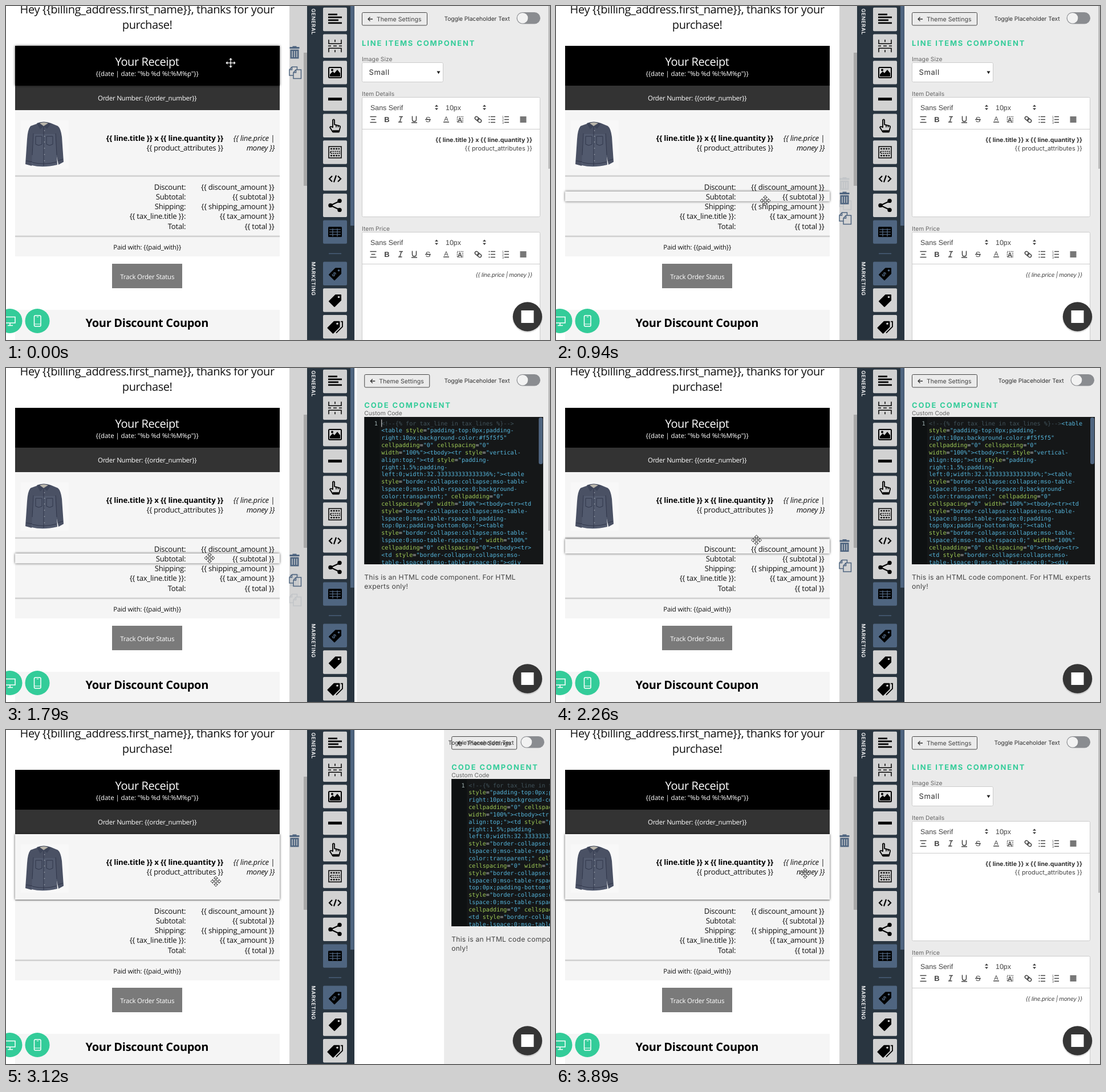
Recreate the animation shown at these times as an HTML page. Size 954 by 587 pixels, loop 3970 ms.

```html
<!DOCTYPE html>
<html lang="en">
<head>
<meta charset="utf-8">
<title>Receipt email editor</title>
<style>
html, body { margin: 0; width: 100%; height: 100%; overflow: hidden; background: #fff; }
svg { display: block; text-rendering: geometricPrecision; }
text { white-space: pre; }
.mail { font-family: "Open Sans", "Noto Sans", sans-serif; font-size: 13.2px; letter-spacing: -.02em; }
.big { font-size: 20px; }
.fine { font-size: 11.5px; }
.ui { font-family: Inter, Roboto, sans-serif; font-size: 10.3px; }
.head { font-size: 13px; font-weight: 700; letter-spacing: 1.85px; }
.edit { font-family: "Liberation Sans", Arial, sans-serif; font-size: 12.4px; }
.code { font-family: "DejaVu Sans Mono", monospace; font-size: 10.17px; }
.bold { font-weight: 700; }
.it { font-style: italic; }
.mid { text-anchor: middle; }
.end { text-anchor: end; }
.line { fill: none; stroke: currentColor; stroke-width: 1.5; }
#hover { filter: drop-shadow(0 .5px 2px rgba(0,0,0,.65)); }
</style>
</head>
<body>
<svg id="stage" width="100%" height="100%" viewBox="0 0 954 587"></svg>
<script>
const LOOP = 3970;
const GREEN = '#33cc99', BLUE = '#4f6580', DARK = '#293540', TILE = '#d2d2d2';

const esc = s => s.replace(/&/g, '&amp;').replace(/</g, '&lt;').replace(/>/g, '&gt;');
const rect = (x, y, w, h, fill, more = '') =>
  `<rect x="${x}" y="${y}" width="${w}" height="${h}" fill="${fill}" ${more}/>`;
const dot = (x, y, r, fill, more = '') => `<circle cx="${x}" cy="${y}" r="${r}" fill="${fill}" ${more}/>`;
const text = (x, y, s, cls, fill = '#000', more = '') =>
  `<text x="${x}" y="${y}" class="${cls}" fill="${fill}" ${more}>${esc(s)}</text>`;
const fill = (d, c = '#000', more = '') => `<path d="${d}" fill="${c}" ${more}/>`;
const line = (d, more = '') => `<path d="${d}" class="line" ${more}/>`;
const at = (x, y, body, more = '') => `<g transform="translate(${x} ${y})" ${more}>${body}</g>`;

/* ---- email preview ---- */

// Hoverable rows: top, bottom, colour, has a copy button
const rows = [
  [70, 140, '#000', 1], [140, 183, '#333', 1], [183, 298, '#f5f5f5', 0], [300.5, 326, '#f5f5f5', 1],
  [326, 343.3, '#f5f5f5', 1], [343.3, 360.6, '#f5f5f5', 1], [360.6, 378, '#f5f5f5', 1]
];

function mailBack() {
  return rect(0, 0, 497, 587, '#fff') + rect(497, 0, 31, 587, '#d3d3d3') + rect(522, 82, 6, 234, '#a9a9a9') +
    rect(16, 70, 464, 70, '#000') + rect(16, 140, 464, 43, '#333') + rect(16, 183, 464, 257, '#f5f5f5') +
    rect(16, 297.5, 464, 2.6, '#d0d0d0') + rect(16, 403.5, 464, 2.6, '#d0d0d0') +
    rect(186, 453, 123, 43, '#7a7a7a') + rect(16, 534, 464, 53, '#f5f5f5');
}

function jacket() {
  return rect(26, 201, 84, 85, '#f8f8f8') +
    fill('M54 207L43 211Q38 217 37 234L34 278L45 281L49 250L86 250L92 279L101 274L98 230Q96 215 91 211L79 206Z', '#4a5164') +
    fill('M47 225L45 280Q65 285 90 279L87 225Z', '#525a6e') +
    fill('M54 206Q66 201 79 206L72 216L66 211L60 217Z', '#3d4458') +
    fill('M59 206Q66 203 74 206L66 211Z', '#b9b5aa') +
    line('M66 212V281M48 224L46 262M87 224L89 262M52 229h11v14l-5.5 2l-5.5-2zM71 229h11v14l-5.5 2l-5.5-2z' +
      'M46 275Q68 280 89 274M35 272l11 2M91 272l9-3', 'color="#30364a" style="stroke-width:1"') +
    [219, 229, 239, 250, 261, 272].map(y => dot(67.5, y, .8, '#aeb2bd')).join('');
}

function mailText() {
  const totals = [['Discount:', 'discount_amount'], ['Subtotal:', 'subtotal'], ['Shipping:', 'shipping_amount'],
    ['{{ tax_line.title }}:', 'tax_amount'], ['Total:', 'total']];
  return text(247.7, 13, 'Hey {{billing_address.first_name}}, thanks for your', 'mail big mid', '#111') +
    text(247.7, 39.5, 'purchase!', 'mail big mid', '#111') +
    text(247.5, 104.5, 'Your Receipt', 'mail big mid', '#fff') +
    text(247.7, 123, '{{date | date: "%b %d %I:%M%p"}}', 'mail fine mid', '#fff', 'style="letter-spacing:-.01em"') +
    text(247.7, 166, 'Order Number: {{order_number}}', 'mail fine mid', '#fff') +
    jacket() +
    text(381, 237, '{{ line.title }} x {{ line.quantity }}', 'mail bold end', '#000', 'style="letter-spacing:-.01em"') +
    text(381, 254, '{{ product_attributes }}', 'mail end', '#111') +
    text(471, 237, '{{ line.price |', 'mail it end', '#111') +
    text(471, 254, 'money }}', 'mail it end', '#111') +
    totals.map(([name, field], i) => text(315.3, 322.7 + i * 17.2, name, 'mail end', '#111') +
      text(470.5, 322.7 + i * 17.2, `{{ ${field} }}`, 'mail end', '#111')).join('') +
    text(247.7, 428, 'Paid with: {{paid_with}}', 'mail fine mid', '#111') +
    text(247.7, 480, 'Track Order Status', 'mail fine mid', '#fff') +
    text(247.3, 564, 'Your Discount Coupon', 'mail big bold mid', '#000', 'style="letter-spacing:-.015em"') +
    dot(7, 553.5, 21.5, GREEN) + dot(55, 553.5, 21.5, GREEN) +
    line('M-2 546.5H16V557H-2M7 557V561M3 561.5H12', 'color="#fff"') +
    '<rect x="49.5" y="544" width="11.5" height="19" rx="2" class="line" color="#fff"/>' +
    line('M50 559H61M54 546.5H57', 'color="#fff" style="stroke-width:1"');
}

const trash = fill('M-3.5-9.5V-11H3.5V-9.5H8.5V-6.5H-8.5V-9.5ZM-7.5-5H7.5V11H-7.5Z', BLUE) +
  line('M-4-2.5V8.5M0-2.5V8.5M4-2.5V8.5', 'color="#d3d3d3" style="stroke-width:1.3"');
const copy = line('M-3 5H-10V-5L-5.5-10H3.5V-5M-10-5H-5.5V-10M-3 0L1.5-5H10.5V10.5H-3ZM-3 0H1.5V-5', `color="${BLUE}"`);
const rowTools = row => at(506, row[0] + 11.6, trash) + (row[3] ? at(507, row[0] + 47, copy) : '');

/* ---- component sidebar ---- */

// Icons are drawn around the tile centre
const tag = fill('M-10 2L1-9H10V0L-1 11Z', '#000', 'stroke="#000" stroke-width="2" stroke-linejoin="round"');
const icons = [
  fill('M-12-10H4V-7.2H-12ZM-12-5H12V-2.2H-12ZM-12 0H6V2.8H-12ZM-12 5H12V7.8H-12Z'),
  line('M-11-11V-4H11V-11M-11 11V4H11V11M-12 0H-7M-3 0H3M7 0H12M0-11V-7M0 7V11'),
  '<rect x="-11" y="-9" width="22" height="18" rx="1.5" class="line" style="stroke-width:2"/>' +
    fill('M-9 7V3L-4-2L-1 1L4-5L9 1V7Z') + dot(-5, -4.5, 2, '#000'),
  rect(-12, -2.5, 24, 5, '#000'),
  fill('M-4-10Q-2.5-12-1-10V-2L7 0Q9.5 .5 9 3L7 11H-4L-9 3Q-8 0-4 3Z', TILE,
    'stroke="#000" stroke-width="1.8" stroke-linejoin="round"') + line('M2-1V3M5.5 0V3') + rect(-4, 8, 11, 4, '#000'),
  '<rect x="-11" y="-10" width="22" height="20" class="line"/>' +
    line('M-8-6H8M-8 6H8', 'stroke-dasharray="3 1.6" style="stroke-width:2.4"') +
    line('M-8-1.5H8V2H-8Z', 'stroke-dasharray="2.4 1.2"'),
  line('M-5-5L-10 0L-5 5M5-5L10 0L5 5M2-6L-2 6', 'style="stroke-width:2.2"'),
  line('M9-8L-8 0L9 8', 'style="stroke-width:2.2"') + dot(8, -8, 3.7, '#000') + dot(-8, 0, 3.7, '#000') + dot(8, 8, 3.7, '#000'),
  rect(-12, -9, 24, 18, '#000', 'rx="1.5"') +
    line('M-10-4.5H10M-10 0H10M-10 4.5H10M-4-6V8M4-6V8', `color="${BLUE}" style="stroke-width:1.3"`),
  tag + dot(6.5, -5.5, 1.8, BLUE) + text(-1.5, 5, '$', 'edit bold mid', BLUE, 'transform="rotate(45 -1.5 1)" style="font-size:11px"'),
  tag + dot(6.5, -5.5, 1.8, TILE),
  at(-2.5, 0, tag) + line('M10-9H13V0L2 11', 'style="stroke-width:1.8"') + dot(4, -5.5, 1.8, TILE)
];

function sidebar() {
  const vertical = (y, s) => text(0, 0, s, 'ui', '#fff',
    `transform="translate(536 ${y}) rotate(90)" style="font-size:9px;font-weight:600;letter-spacing:.6px"`);
  return rect(528, 0, 83, 587, DARK) + rect(604, 0, 6.5, 386, BLUE) +
    vertical(4.5, 'GENERAL') + vertical(449.5, 'MARKETING') + rect(566, 434.5, 22, 1.3, BLUE) +
    icons.map((icon, i) => {
      const y = 23.5 + i * 46.7 + (i > 8 ? 26.5 : 0);
      const active = i === 8 || i === 9;
      return at(577, y, rect(-21, -20.7, 42, 41.4, active ? BLUE : TILE, 'rx="2"') + icon);
    }).join('');
}

/* ---- settings panels ---- */

const panelTop = title => rect(611, 0, 343, 587, '#ebebeb') +
  rect(624.5, 11.5, 114, 22.5, 'none', 'rx="2" stroke="#444"') +
  line('M643 23H635M638.5 19.5L635 23L638.5 26.5', 'color="#333" style="stroke-width:1.3"') +
  text(650, 26.7, 'Theme Settings', 'ui', '#444', 'style="font-size:10.6px"') +
  text(624, 69.7, title, 'ui head', GREEN);

function toolbar() {
  const bars = (x, w) => [-5, 0, 5].map((dy, i) => `M${x - w[i] / 2} ${199.5 + dy}h${w[i]}`).join('');
  const glyph = (x, s, cls = '') => text(x, 203.7, s, 'edit mid ' + cls, '#444', 'style="font-size:13px"');
  const sort = x => fill(`M${x - 3} 177l3-3.5l3 3.5zM${x - 3} 179.5l3 3.5l3-3.5z`, '#444');
  return text(639, 183, 'Sans Serif', 'edit', '#444') + text(771, 183, '10px', 'edit', '#444') + sort(755) + sort(839) +
    '<g color="#444">' + line(bars(644, [11, 7, 11])) + glyph(668, 'B', 'bold') +
    line('M689.5 194.5h6.5M688 204h6.5M693.5 194.5l-3 9.5') +
    line('M712.5 193.5v5.5q0 4 3.5 4t3.5-4v-5.5M711 205h10') +
    glyph(740, 'S') + line('M735 199.5h10') +
    text(772, 201.5, 'A', 'edit mid', '#444', 'style="font-size:11px"') + line('M767 204h10') +
    '<rect x="791.5" y="194.5" width="9.5" height="10" class="line" stroke-dasharray="1.5 1.5"/>' +
    text(796, 203.7, 'A', 'edit mid bold', '#444', 'style="font-size:11px"') +
    '<g transform="rotate(40 828 199.5)"><rect x="821.5" y="196.8" width="7.5" height="5.4" rx="2.7" class="line"/>' +
    '<rect x="827" y="196.8" width="7.5" height="5.4" rx="2.7" class="line"/></g>' +
    line(bars(854, [8, 8, 8])) + line(bars(847.5, [2, 2, 2])) + line(bars(878, [8, 8, 8])) +
    [...'123'].map((n, i) => text(871.5, 197 + i * 5, n, 'edit mid', '#444', 'style="font-size:5.5px"')).join('') +
    '</g>' + rect(901.5, 194, 11, 11, '#777');
}

function itemsPanel() {
  const box = y => rect(624.5, y + .5, 312, 210, '#fff', 'rx="2" stroke="#ccc"') + rect(625, y + 56, 311, 1, '#ccc');
  const label = (y, s) => text(624, y, s, 'ui', '#666');
  return panelTop('LINE ITEMS COMPONENT') + label(97, 'Image Size') +
    rect(624.5, 99.5, 142, 34, '#fff', 'rx="2" stroke="#ccc"') +
    text(636.5, 121.3, 'Small', 'ui', '#333', 'style="font-size:13px;letter-spacing:.6px"') +
    fill('M755.5 114.5h6l-3 5z', '#222') +
    label(158, 'Item Details') + box(160) + toolbar() +
    text(923, 238.7, '{{ line.title }} x {{ line.quantity }}', 'ui bold end', '#333', 'style="font-size:10.7px"') +
    text(923, 254.3, '{{ product_attributes }}', 'ui end', '#444', 'style="font-size:10.9px"') +
    label(395, 'Item Price') + box(397) + at(0, 237, toolbar()) +
    text(923, 475.5, '{{ line.price | money }}', 'ui it end', '#444', 'style="font-size:10px;letter-spacing:-.3px"');
}

const mso = 'border-collapse:collapse;mso-table-lspace:0;mso-table-rspace:0;';
const source = '<!--{% for tax_line in tax_lines %}--><table style="padding-top:0px;padding-right:10px;background-color:#f5f5f5" ' +
  'cellpadding="0" cellspacing="0" width="100%"><tbody><tr style="vertical-align:top;"><td style="padding-right:1.5%;' +
  `padding-left:0;width:32.333333333333336%;"><table style="${mso}background-color:transparent;" cellpadding="0" ` +
  `cellspacing="0" width="100%"><tbody><tr><td style="${mso}padding-top:0px;padding-bottom:0px;"><table style="${mso}" ` +
  `width="100%" cellpadding="0" cellspacing="0"><tbody><tr><td style="${mso}"><div`;

const tint = s => s.startsWith('<!') ? '#41535b' : /^[<>"]/.test(s) ? '#55b5db' : /^\w/.test(s) ? '#9fca56' : '#cfd2d1';
const tints = source.match(/<!--.*?-->|<\w+|"[^"]*"|\w+|./g).flatMap(s => Array(s.length).fill(tint(s)));

// Break after spaces, hyphens and between tags
function wrap(cols) {
  const lines = [''];
  for (const word of source.match(/.+?(?:\s|-(?=[a-z])|>(?=<)|$)/g)) {
    const last = lines.length - 1;
    if ((lines[last] + word).trimEnd().length <= cols) lines[last] += word;
    else lines.push(word);
  }
  return lines;
}

function codeLines(cols) {
  let pos = 0;
  return wrap(cols).map((s, i) => {
    let out = '', from = 0;
    for (let k = 1; k <= s.length; k++) {
      if (k < s.length && tints[pos + k] === tints[pos + from]) continue;
      out += `<tspan fill="${tints[pos + from]}">${esc(s.slice(from, k))}</tspan>`;
      from = k;
    }
    pos += s.length;
    return `<text x="30" y="${14.5 + i * 12.85}" class="code">${out}</text>`;
  }).join('');
}

function codePanel(wide) {
  const w = wide ? 321 : 314;
  const note = 'This is an HTML code component. For HTML experts only!';
  const cut = note.indexOf(wide ? ' only' : ' experts');
  const noteLine = (y, s) => text(624, y, s, 'ui', '#444', 'style="font-size:12.2px;letter-spacing:.2px"');
  return panelTop('CODE COMPONENT') + text(624, 83.3, 'Custom Code', 'ui', '#666') +
    `<svg x="624" y="86" width="${w}" height="259">` + rect(0, 0, w, 259, '#151718') + rect(0, 0, 27, 259, '#0e1112') +
    text(23.5, 14.5, '1', 'code end', '#9fb0b0') + codeLines(wide ? 44 : 43) +
    rect(30, 4.5, 1, 13, '#e8e8e8', 'class="caret"') + rect(w - 8, 1, 7, 82, BLUE, 'rx="3"') + '</svg>' +
    noteLine(371.5, note.slice(0, cut)) + noteLine(388, note.slice(cut + 1));
}

const toggle = text(768.5, 25.8, 'Toggle Placeholder Text', 'ui', '#333', 'style="letter-spacing:-.01em"') +
  rect(895.5, 11, 41.5, 20.5, '#8a8c90', 'rx="10.25"') + dot(906, 21.2, 9.3, '#f2f2f2');

const chat = dot(914.5, 547.5, 26.5, '#000', 'opacity=".12"') + dot(914.5, 546, 25.7, '#353535') +
  rect(903.5, 535, 22, 22, '#fff');

const pointer = fill('M0-9L3.5-5.3H1V-1H5.3V-3.5L9 0L5.3 3.5V1H1V5.3H3.5L0 9L-3.5 5.3H-1V1H-5.3V3.5L-9 0L-5.3-3.5V-1H-1V-5.3H-3.5Z',
  '#fff', 'stroke="#222" stroke-width=".9"');

const stage = document.getElementById('stage');
stage.innerHTML = '<clipPath id="area"><rect x="611" y="0" width="343" height="587"/></clipPath>' +
  mailBack() + '<rect id="hover" x="16" width="464"/>' + mailText() +
  '<g id="ghost" opacity=".12"></g><g id="tools"></g>' + sidebar() + rect(611, 0, 343, 587, '#fff') +
  `<g clip-path="url(#area)"><g id="items">${itemsPanel()}</g>` +
  `<g id="narrow">${codePanel(false)}</g><g id="wide">${codePanel(true)}</g></g>` +
  `<g id="toggle">${toggle}</g>` +
  `<g id="scroll">${rect(951, 0, 3, 587, '#ececec') + rect(951, 0, 3, 286, '#bdbdbd')}</g>` +
  chat + `<g id="pointer">${pointer}</g>`;

const el = id => document.getElementById(id);
const carets = document.querySelectorAll('.caret');
const show = (node, on) => node.setAttribute('display', on ? 'inline' : 'none');
const move = (id, x, y = 0) => el(id).setAttribute('transform', `translate(${x} ${y})`);

/* ---- motion ---- */

// The screen refreshes in bursts: start, end, count
const bursts = [[60, 540, 7], [610, 1090, 7], [1170, 1320, 3], [1630, 2100, 7], [2180, 2650, 7], [2880, 2880, 1],
  [3050, 3430, 6], [3810, 3890, 2]];
const ticks = [0, ...bursts.flatMap(([a, b, n]) =>
  Array.from({ length: n }, (_, i) => Math.floor((a + (b - a) * i / Math.max(1, n - 1)) / 10) * 10))];

// Pointer path: time, x, y
const trail = [[0, 394, 100], [60, 393, 104], [220, 388, 146], [380, 380, 215], [540, 372, 246], [690, 369, 262],
  [850, 367, 312], [930, 367, 342], [1090, 367, 351], [1320, 367, 363], [1630, 367, 363], [1700, 364, 361.5],
  [1780, 357, 334], [2100, 352, 328], [2180, 352, 318], [2330, 351, 285], [2490, 351, 270], [2650, 351, 266],
  [3050, 352, 266], [3120, 368, 266], [3200, 396, 265], [3350, 426, 260], [3430, 431, 259], [3810, 435, 255], [3890, 437, 252]];

function pointerAt(t) {
  const i = trail.findIndex(p => p[0] > t);
  if (i < 0) return trail[trail.length - 1].slice(1);
  const [a, b] = [trail[i - 1], trail[i]], u = (t - a[0]) / (b[0] - a[0]);
  return [a[1] + (b[1] - a[1]) * u, a[2] + (b[2] - a[2]) * u];
}
const rowAt = t => {
  const y = pointerAt(t)[1];
  return rows.find(r => y >= r[0] && y < r[1]) || rows[2];
};

// After a click the old panel leaves to the right, then the new one comes in
const OPEN = 1615.5, CLOSE = 3052, OUT = 100, IN = 84;
function slide(dt) {
  if (dt < 0) return 0;
  return dt < OUT ? 340 * (dt / OUT) ** 2 : 340 * Math.max(0, 1 - (dt - OUT) / IN) ** 3;
}

function draw(time) {
  const k = ticks.findLastIndex(s => s <= time), t = ticks[k];
  const row = rowAt(t), before = k ? rowAt(ticks[k - 1]) : row;
  const hover = el('hover');
  hover.setAttribute('y', row[0]);
  hover.setAttribute('height', row[1] - row[0]);
  hover.setAttribute('fill', row[2]);
  el('tools').innerHTML = rowTools(row);
  el('ghost').innerHTML = before === row ? '' : rowTools(before);
  move('pointer', ...pointerAt(t));

  const code = t >= OPEN + OUT && t < CLOSE + OUT;
  const wide = code && t >= OPEN + OUT + IN;
  const x = slide(t - (t < CLOSE ? OPEN : CLOSE));
  show(el('items'), !code);
  show(el('narrow'), code && !wide);
  show(el('wide'), wide);
  ['items', 'narrow', 'wide'].forEach(id => move(id, x));
  move('toggle', wide ? 7 : 0);
  show(el('scroll'), !wide);
  const lit = t < 1820 || (t >= 2330 && t < 2880);
  carets.forEach(c => show(c, lit));
}

function loop() {
  draw(performance.now() % LOOP);
  requestAnimationFrame(loop);
}
loop();
</script>
</body>
</html>
```
